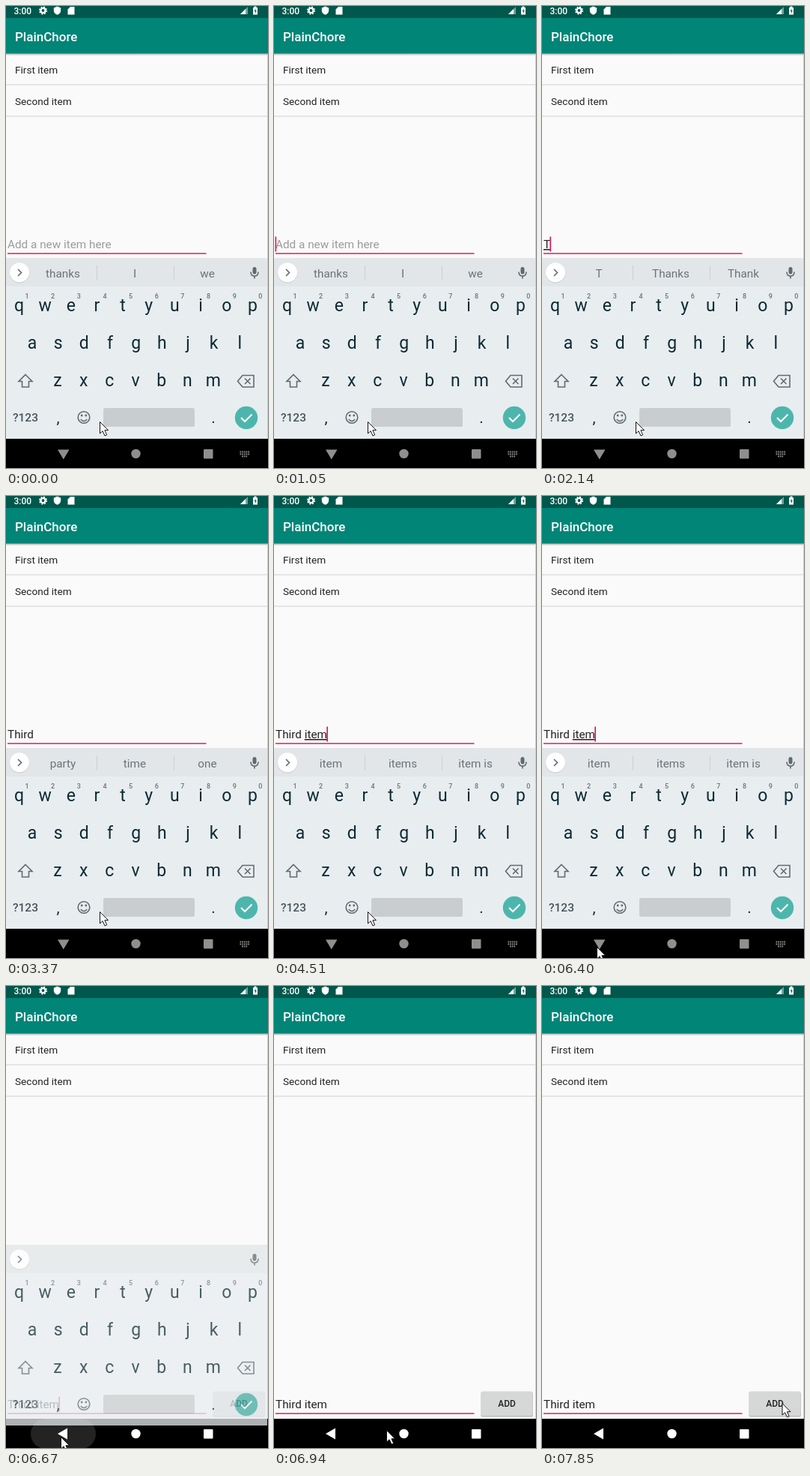
An HTML page that plays this animation: 350 px wide and 616 px high, repeating every 8 s.

```html
<!DOCTYPE html>
<html lang="en">
<head>
<meta charset="utf-8">
<title>Adding a to-do item</title>
<style>
  html, body { margin: 0; width: 100%; height: 100%; overflow: hidden; background: #fafafa; }
  svg { display: block; font-family: Roboto, sans-serif; }
  text { white-space: pre; }
  .mid { text-anchor: middle; }
  .line { fill: none; stroke: #5f6b70; stroke-width: 1.6; }
  #composing { text-decoration: underline; }
</style>
</head>
<body>
<svg width="350" height="616" viewBox="0 0 350 616">
  <defs>
    <linearGradient id="shade" x2="0" y2="1">
      <stop stop-color="#000" stop-opacity=".28"/>
      <stop offset="1" stop-color="#000" stop-opacity="0"/>
    </linearGradient>
  </defs>
  <rect width="350" height="616" fill="#fafafa"/>

  <!-- Status bar and title bar -->
  <rect width="350" height="16" fill="#00574b"/>
  <rect y="16" width="350" height="47.5" fill="#008577"/>
  <rect y="63.5" width="350" height="3" fill="url(#shade)"/>
  <g fill="#fff">
    <text x="10.5" y="10.5" font-size="12" font-weight="500">3:00</text>
    <circle cx="49.5" cy="6" r="3.1" fill="none" stroke="#fff" stroke-width="2.4"/>
    <circle cx="49.5" cy="6" r="4.7" fill="none" stroke="#fff" stroke-width="1.6" stroke-dasharray="2 1.69"/>
    <path d="M68.500 .5l4.700 2v3.500q0 4-4.700 5.800q-4.700-1.800-4.700-5.800v-3.500z"/>
    <path d="M86 1h5.500v10.500h-9v-7z"/>
    <path d="M313 11l10-10v10z" opacity=".45"/>
    <path d="M313 11l7-7v7z"/>
    <path d="M330 2h1.500v-1.500h3v1.500h1.500v9.500h-6z"/>
    <text x="12" y="46.500" font-size="17" font-weight="500">PlainChore</text>
  </g>
  <path d="M333.500 3.500l-1.800 3.500h1.300v3l1.800-3.700h-1.300z" fill="#00574b"/>

  <g font-size="13.6" fill="#222">
    <text x="12" y="89.500">First item</text>
    <text x="12" y="131.500">Second item</text>
  </g>
  <path d="M0 105h350M0 147h350" stroke="#dedede" stroke-width="1.7"/>

  <!-- Entry field -->
  <g id="entry">
    <text x="2" y="323" font-size="15.3" id="field"><tspan id="done"></tspan><tspan id="composing"></tspan></text>
    <path d="M2 330h265.500" stroke="#d81b60" stroke-width="1.7"/>
    <rect id="caret" y="307.500" width="1.7" height="20" fill="#d81b60"/>
  </g>
  <g id="add">
    <rect x="276.500" y="541.500" width="69.500" height="33" rx="2" fill="#bbb"/>
    <rect x="276.500" y="540.500" width="69" height="32.500" rx="2" fill="#d6d7d7"/>
    <text class="mid" x="311" y="560.500" font-size="12" font-weight="500" fill="#222">ADD</text>
  </g>
  <path d="M349.500 64v513" stroke="#c9cdce"/>

  <!-- Navigation bar -->
  <rect y="577" width="350" height="39" fill="#000"/>
  <rect id="ripple" x="33" y="577" width="87" height="40" rx="20" fill="#232323"/>
  <g id="nav">
    <path id="back"/>
    <circle cx="173.500" cy="597" r="6.200"/>
    <rect x="264" y="591" width="12.500" height="12.500" rx="1"/>
    <path id="switcher" d="M312.500 594.500h13M312.500 597.500h13M315 600.500h8" fill="none" stroke="#8f8f8f" stroke-width="2" stroke-dasharray="1.700 1"/>
  </g>

  <!-- Keyboard -->
  <g id="keyboard">
    <rect y="336" width="349" height="241" fill="#e8edf0"/>
    <rect y="336" width="349" height="38" fill="#e2e6e8"/>
    <circle cx="18" cy="356" r="13.500" fill="#cfd4d6"/>
    <circle cx="18" cy="355.200" r="13" fill="#fff"/>
    <path class="line" d="M16 351l4.500 4.500l-4.500 4.500"/>
    <rect x="329.500" y="348" width="5" height="9.500" rx="2.500" fill="#5f6b70"/>
    <path class="line" d="M327 354.500q0 5.500 5 5.500t5-5.500M332 360v3.500"/>
    <g id="suggestions" class="mid" font-size="15.3" fill="#6b7378">
      <path d="M121.500 346v20M224.500 346v20" stroke="#cbd0d2"/>
      <text x="76" y="361.500"></text><text x="172" y="361.500"></text><text x="269" y="361.500"></text>
    </g>
    <g id="keys" class="mid" fill="#0d2a33"></g>
    <path class="line" d="M26 491.500l9 9h-4.500v7.500h-9v-7.500h-4.500z"/>
    <path class="line" d="M316 492.500h15v15.500h-15l-6.500-7.750zM319 496.500l7.500 7.500M326.500 496.500l-7.500 7.500"/>
    <text x="9" y="554" font-size="15.5" font-weight="500" fill="#46555b">?123</text>
    <circle class="line" cx="104" cy="548.500" r="7.800"/>
    <path class="line" d="M99.800 551q4.200 5 8.400 0"/>
    <circle cx="101.200" cy="546" r="1.400" fill="#5f6b70"/>
    <circle cx="106.800" cy="546" r="1.400" fill="#5f6b70"/>
    <rect x="130" y="536" width="122" height="25" rx="2.500" fill="#c9cdcf"/>
    <circle cx="321" cy="549" r="15.200" fill="#4db6ac"/>
    <path d="M314 549l5 5l9.500-9.500" fill="none" stroke="#fff" stroke-width="2.100"/>
  </g>

  <path id="pointer" d="M.5 .5v15.500l3.600-3.300l2.900 6.300l2.700-1.200l-2.800-6.100h4.600z" fill="#fff" stroke="#111"/>
</svg>
<script>
const LOOP = 8000;
const KEY_STEP = 34.65;
const $ = id => document.getElementById(id);

// [time, finished text, text being composed, three suggestions]
const typing = [
  [0, '', '', 'thanks', 'I', 'we'],
  [2140, '', 'T', 'T', 'Thanks', 'Thank'],
  [2290, '', 'Th', 'Th', 'Thanks', 'Thank'],
  [2570, '', 'Thir', 'Thir', 'Third', 'Thirty'],
  [2850, '', 'Third', 'Third', 'Thirds', 'Thirdly'],
  [3000, 'Third ', '', 'party', 'time', 'one'],
  [3960, 'Third ', 'i', 'i', 'is', 'in'],
  [4080, 'Third ', 'it', 'it', 'its', 'it is'],
  [4230, 'Third ', 'ite', 'ite', 'item', 'items'],
  [4510, 'Third ', 'item', 'item', 'items', 'item is'],
  [6670, 'Third item', '', '', '', '']
];
const caretToggles = [120, 520, 1050, 1580, 2140, 3370, 3960, 4940, 5470, 5860, 6400, 6940, 7330, 7850];
// [time, x, y]
const pointerStops = [
  [0, 125, 554], [5590, 262, 557], [5740, 144, 581], [5860, 114, 583],
  [6010, 95, 588], [6130, 82, 594], [6250, 73, 601], [6940, 150, 592],
  [7060, 222, 580], [7210, 280, 569], [7330, 305, 561], [7450, 315, 558], [7570, 320.5, 556]
];

const latest = (steps, t) => steps.findLast(step => step[0] <= t);
const show = (id, visible) => $(id).setAttribute('visibility', visible ? 'visible' : 'hidden');
const move = (id, x, y) => $(id).setAttribute('transform', `translate(${x} ${y})`);
const label = (text, x, y, size, extra = '') =>
  `<text x="${x}" y="${y}" font-size="${size}" ${extra}>${text}</text>`;

function keyRow(letters, x, y) {
  return [...letters].map((letter, i) => label(letter, x + i * KEY_STEP, y, 23)).join('');
}

$('keys').innerHTML =
  keyRow('qwertyuiop', 17.5, 406.5) + keyRow('asdfghjkl', 35, 456.5) + keyRow('zxcvbnm', 69, 506.5) +
  [...'1234567890'].map((digit, i) =>
    label(digit, 28 + i * KEY_STEP, 389.5, 9, 'font-weight="500" fill="#6b7378"')).join('') +
  label(',', 69.5, 556, 21) + label('.', 277, 556, 21);

const suggestionLabels = $('suggestions').querySelectorAll('text');

function draw(t) {
  const [, done, composing, ...words] = latest(typing, t);
  const empty = !done && !composing;
  const closing = t >= 6670;
  const pressed = t >= 6520;

  $('done').textContent = empty ? 'Add a new item here' : done;
  $('composing').textContent = composing;
  $('field').setAttribute('fill', empty ? '#9b9b9b' : '#222');
  $('caret').setAttribute('x', empty ? 1.5 : 1.3 + $('field').getComputedTextLength());
  show('caret', caretToggles.filter(time => time <= t).length % 2);
  move('entry', 0, closing ? 240 : 0);
  show('add', closing);

  suggestionLabels.forEach((node, i) => node.textContent = words[i]);
  show('suggestions', !closing);
  show('keyboard', t < 6820);
  $('keyboard').setAttribute('opacity', closing ? .75 : 1);
  move('keyboard', 0, closing ? 9 : 0);
  if (t >= 6820) show('suggestions', false);

  $('nav').setAttribute('fill', pressed ? '#fff' : '#8f8f8f');
  $('back').setAttribute('d', pressed ? 'M69 597l13-7.5v15z' : 'M69 591.500h15.500l-7.750 13z');
  show('switcher', !pressed);
  show('ripple', pressed && t < 6940);
  $('ripple').setAttribute('opacity', t < 6820 ? 1 : .5);

  move('pointer', ...latest(pointerStops, t).slice(1));
}

function frame() {
  draw(performance.now() % LOOP);
  requestAnimationFrame(frame);
}
frame();
</script>
</body>
</html>
```
